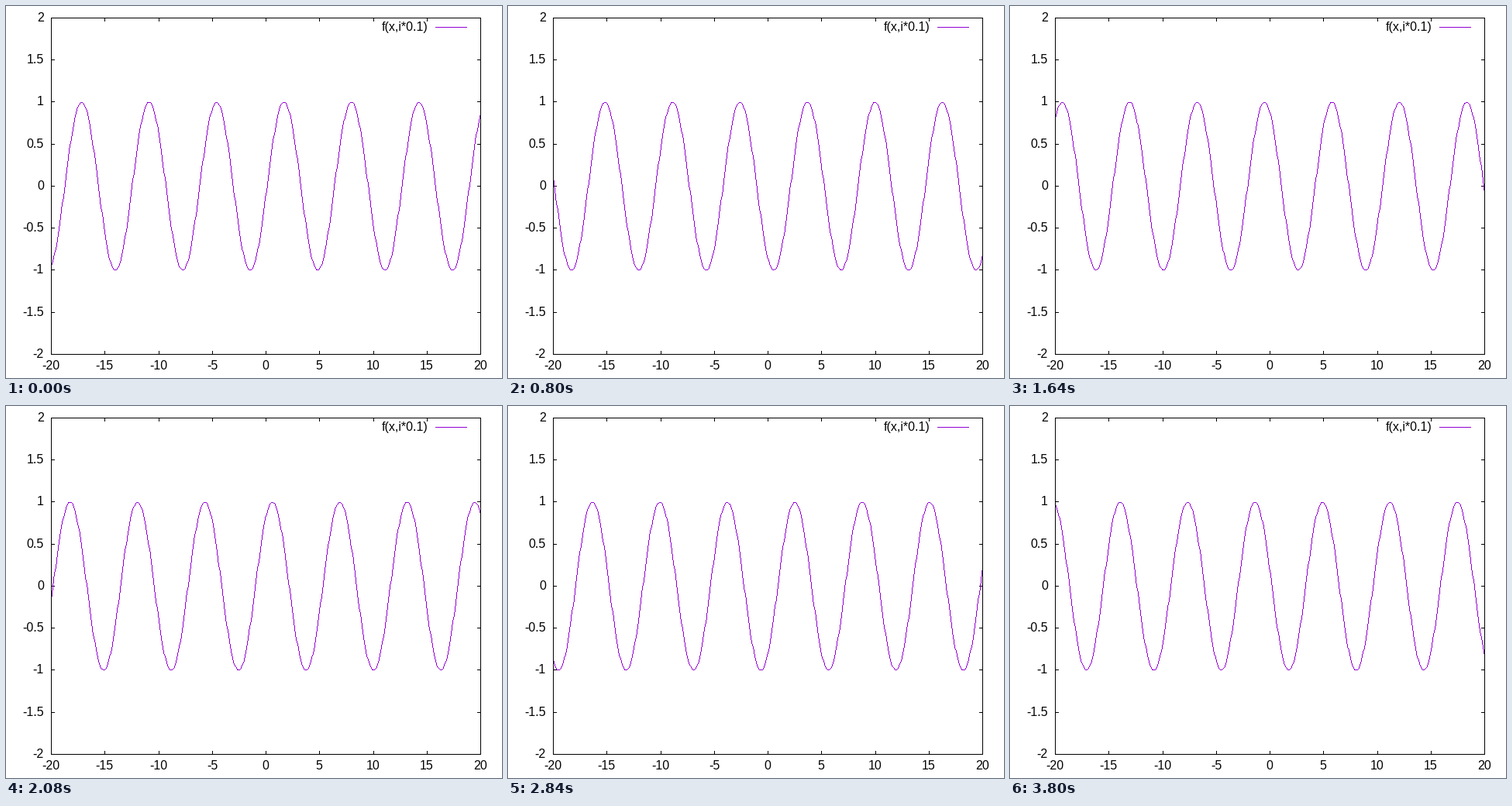
Animation of 640x480 px, one loop 3.84 s. Source, as a matplotlib script:

```python
import numpy as np
import matplotlib.pyplot as plt
from matplotlib.animation import FuncAnimation
from matplotlib.transforms import IdentityTransform

WIDTH, HEIGHT, DPI = 640, 480, 100
LEFT, RIGHT, TOP, BOTTOM = 58, 612, 15, 449
TICK, GAP, DROP = 4, 9, 5
KEY_X0, KEY_X1, KEY_Y = 554, 594, 27
FRAMES, INTERVAL = 96, 40
SAMPLES = 500
BLACK, PURPLE = (0, 0, 0), (148, 0, 211)

plt.rcParams.update({
    "font.family": "Liberation Sans",
    "font.size": 16 * 72 / DPI,
    "text.hinting": "default",
    "text.hinting_factor": 8,
})


def nearest(v):
    return np.floor(np.asarray(v) + 0.5).astype(int)


def to_col(x):
    return nearest(LEFT + (x + 20) / 40 * (RIGHT - LEFT))


def to_row(y):
    # Round upwards from the bottom edge of the stage.
    up = HEIGHT - 1 - BOTTOM + (y + 2) / 4 * (BOTTOM - TOP)
    return HEIGHT - 1 - nearest(up)


def draw_line(img, x0, y0, x1, y1, color):
    """One pixel wide line without smoothing."""
    if abs(y1 - y0) > abs(x1 - x0) and y1 < y0:
        x0, y0, x1, y1 = x1, y1, x0, y0
    n = max(abs(x1 - x0), abs(y1 - y0))
    t = np.arange(n + 1) / max(n, 1)
    img[nearest(y0 + (y1 - y0) * t), nearest(x0 + (x1 - x0) * t)] = color


def draw_border(img):
    img[[TOP, BOTTOM], LEFT:RIGHT + 1] = BLACK
    img[TOP:BOTTOM + 1, [LEFT, RIGHT]] = BLACK


def label(x, baseline, s, align):
    fig.text(x, HEIGHT - baseline, s, color="black", ha=align,
             va="baseline", transform=IdentityTransform())


fig = plt.figure(figsize=(WIDTH / DPI, HEIGHT / DPI), dpi=DPI, facecolor="white")
base = np.full((HEIGHT, WIDTH, 3), 255, dtype=np.uint8)

for v in range(-20, 21, 5):
    col = int(to_col(v))
    base[TOP:TOP + TICK + 1, col] = BLACK
    base[BOTTOM - TICK:BOTTOM + 1, col] = BLACK
    label(col, BOTTOM + 20, str(v), "center")

for v in np.arange(-2, 2.5, 0.5):
    row = int(to_row(v))
    base[row, LEFT:LEFT + TICK + 1] = BLACK
    base[row, RIGHT - TICK:RIGHT + 1] = BLACK
    label(LEFT - GAP, row + DROP, f"{v:g}", "right")

# Key
label(KEY_X0 - GAP, KEY_Y + DROP, "f(x,i*0.1)", "right")
base[KEY_Y, KEY_X0:KEY_X1 + 1] = PURPLE

xs = np.linspace(-20, 20, SAMPLES)
cols = to_col(xs)
plot = fig.figimage(base, origin="upper")


def update(frame):
    img = base.copy()
    rows = to_row(np.sin(xs - (frame + 1) * 0.1))
    for x0, y0, x1, y1 in zip(cols, rows, cols[1:], rows[1:]):
        draw_line(img, x0, y0, x1, y1, PURPLE)
    draw_border(img)
    plot.set_data(img)
    return [plot]


anim = FuncAnimation(fig, update, frames=FRAMES, interval=INTERVAL,
                     repeat=True, repeat_delay=0)
plt.show()
```
